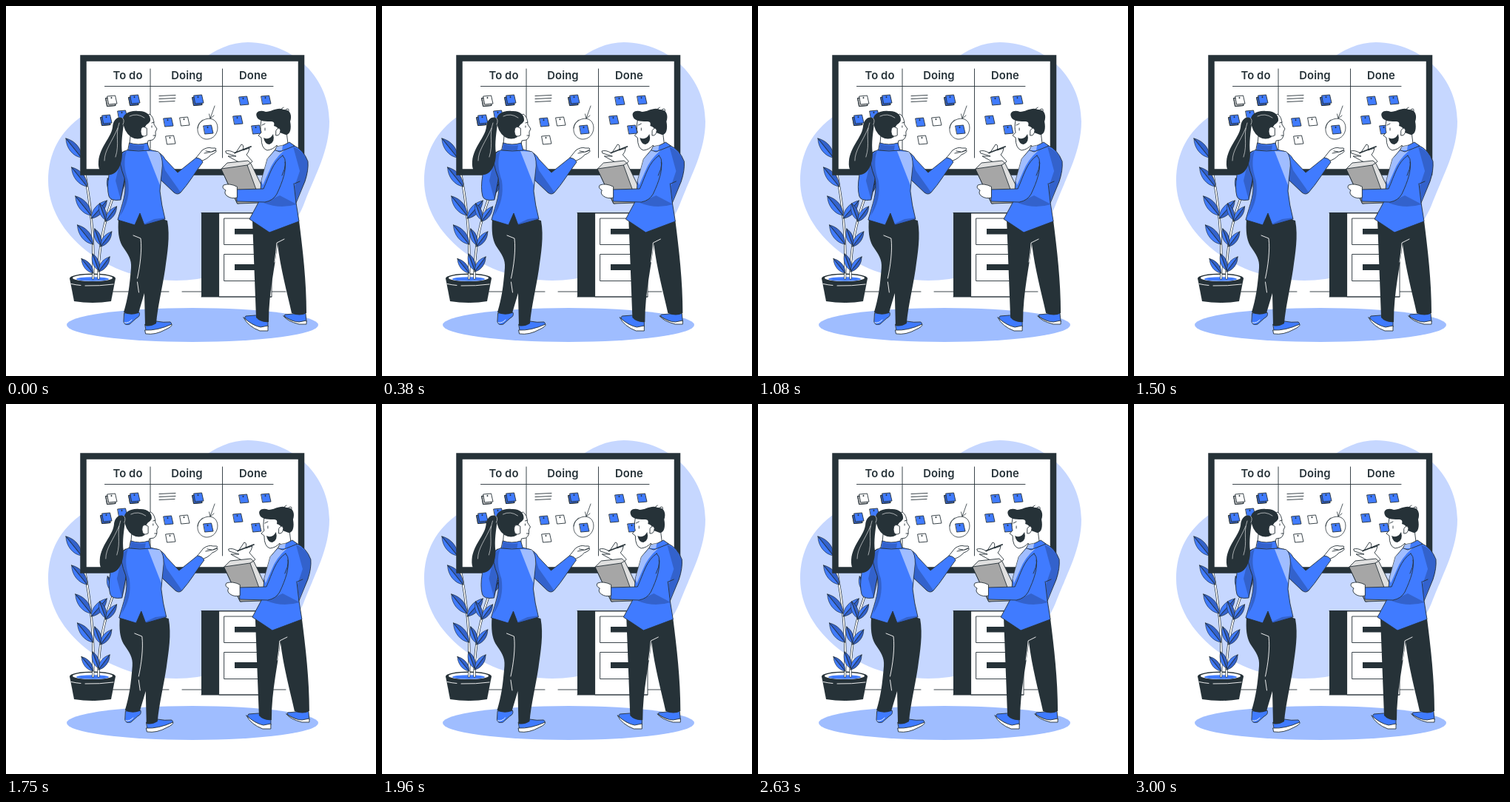
Animation of 500 by 500 pixels, one loop 3.04 s. Source, as an HTML page:

```html
<!DOCTYPE html>
<html lang="en">
<head>
<meta charset="utf-8">
<title>Task board</title>
<style>
html, body { margin: 0; width: 100%; height: 100%; overflow: hidden; background: #fff; }
svg { display: block; width: 100vw; height: 100vh; }
path, ellipse { stroke-linejoin: round; stroke-linecap: round; }
text { font: 600 14.8px Inter, "Open Sans", sans-serif; letter-spacing: .1px; fill: #263238; text-anchor: middle; }
.b { fill: #407bff; stroke: #263238; }
.w { fill: #fff; stroke: #263238; }
.d { fill: #263238; }
.l { fill: none; stroke: #263238; }
.wl { fill: none; stroke: #fff; }
.sh { fill: #000; fill-opacity: .2; }
.hi { fill: #fff; fill-opacity: .5; }
</style>
</head>
<body>
<svg viewBox="0 0 500 500" stroke-width=".9">
  <defs>
    <path id="sheet" d="M0 1L10.500 0L13 11L2 12Z"/>
    <g id="note"><use href="#sheet"/><circle class="d" cx="5.500" cy="3" r=".7"/></g>
    <g id="stack"><use href="#sheet" x="-1" y="2.500"/><use href="#sheet" x="-1" y="2.500" class="sh"/><use href="#note" x="1"/></g>
  </defs>

  <path fill="#c6d7ff" d="M104 148C150 122 222 106 260 77C282 58 305 49 327 49C390 50 437 98 437 156C437 195 418 228 404 264C382 326 306 371 230 371C138 371 57 309 57 236C57 199 73 169 104 148Z"/>
  <ellipse cx="252" cy="431" rx="170" ry="23" fill="#9fbdff"/>
  <path class="l" d="M141 386H220M238 386H378"/>

  <g id="cabinet">
    <path class="w" d="M288 280H359V393H288Z"/>
    <path class="d" d="M264 279H288V393H264Z"/>
    <path class="l" d="M264 279.500H359M264 393H359M295 287H354V322.500H295ZM295 335.500H354V371.500H295Z"/>
    <path class="d" d="M309 301H340V308.500H309ZM309 349H340V357H309Z"/>
  </g>

  <g id="plant">
    <path class="d" d="M86 368L92 399Q117 403 142 399L148 368Z"/>
    <ellipse cx="117" cy="368" rx="31" ry="6.500" class="d"/>
    <ellipse cx="117" cy="367.500" rx="27" ry="4.500" fill="#fff"/>
    <ellipse cx="117" cy="369" rx="22" ry="2.800" fill="#407bff"/>
    <path class="wl" d="M88 375.500Q95 377 101 377.500M107 378Q127 378.500 145 376"/>
    <g id="leaves"></g>
  </g>

  <g id="board">
    <path fill="#fff" stroke="#263238" stroke-width="8.500" style="stroke-linejoin:miter" d="M104.500 70.500H399V224.500H104.500Z"/>
    <path class="l" d="M133.500 108.500H361M195 85V205M292.500 85V205"/>
    <text x="164.500" y="99">To do</text>
    <text x="244.500" y="99">Doing</text>
    <text x="334" y="99">Done</text>
    <path class="l" d="M207 121.500L229 120.500M207 125.500L229 124.500M207 129.500L228 128.500"/>
    <g class="b">
      <use href="#stack" x="167" y="120"/>
      <use href="#stack" x="129" y="147"/>
      <use href="#note" x="151" y="141"/>
      <use href="#stack" x="253" y="120"/>
      <use href="#note" x="213" y="151"/>
      <use href="#note" x="267" y="161"/>
      <use href="#note" x="315" y="122"/>
      <use href="#note" x="345" y="121"/>
      <use href="#note" x="307" y="148"/>
      <use href="#note" x="332" y="161"/>
    </g>
    <g class="w">
      <use href="#stack" x="136" y="121"/>
      <use href="#note" x="235" y="150"/>
      <use href="#note" x="216" y="175"/>
    </g>
    <path class="l" stroke-width=".8" d="M266 154C255 160 257 178 270 180C287 181 291 158 279 153C272 150 260 155 259 165M282 135L276 152M274.500 146L276 152L281 148"/>
  </g>

  <g id="woman">
    <path class="b" d="M160 415L180 414Q182 419 176 422L167 430Q160 432 159 427Z"/>
    <path class="wl" d="M160 428Q166 429 170 424"/>
    <path class="b" d="M188 430L203 426Q213 428 222 427Q226 430 220 433Q205 441 190 441Z"/>
    <path class="w" d="M188 438Q204 439 224 430Q225 433 216 437Q202 445 189 443Z"/>
    <path class="d" d="M152 288C151 304 152 315 157 324C165 336 170 342 169 354C167 379 165 394 159 414Q168 419 179 415L187 388L188 432Q195 434 203 429C205 406 211 382 215 356C218 334 222 312 218 290L182 279Z"/>
    <path class="wl" d="M172 310L182 314C184 330 181 352 177.500 368M177.500 373L179.500 387"/>
    <path class="b" d="M160 196C150 201 143 212 139 229Q136 246 139 257Q141 264 155 262L162 225Z"/>
    <path class="sh" d="M154 210L148 236L155 262L162 240Z"/>
    <path class="w" d="M257 205L265 195Q272 190 278 192L283 192Q286 194 278 197L284 195Q285 198 277 201Q271 208 262 210Z"/>
    <path class="l" d="M270 196L276 197M268 199L278 197"/>
    <path class="b" d="M202 196Q211 199 215 207L232 225L257 205Q264 206 266 211C256 224 247 240 236 252Q232 256 227 252L207 233Z"/>
    <path class="sh" d="M210 205L215 222L232 246L236 252Q232 255 227 252L207 233Z"/>
    <path class="b" d="M166 194Q180 196 193 194L206 197Q212 203 211 216L208 250Q210 269 215 288L187 296L181 280L174 296L151 289C157 267 164 252 160 232Q152 212 155 202Q158 196 166 194Z"/>
    <path class="sh" d="M163 196Q157 214 165 236Q169 262 154 284C160 264 164 250 160 232Q152 212 155 202ZM187 294L200 288L215 286L214 288L187 296Z"/>
    <path class="hi" d="M190 196L206 197Q211 203 211 216L208 242Z"/>
    <path class="w" d="M168 176L167 187Q179 193 191 188L192 182L198 181Q203 178 202 170L204 166L200 160Q200 150 194 146L172 158Z"/>
    <path class="l" d="M197 158L200 157M197 162V164M199 175L202 175"/>
    <path class="b" d="M167 185Q179 189 191 185L194 195Q179 197 165 195Z"/>
    <path class="sh" d="M167 186Q177 190 187 188L186 195H166Z"/>
    <path class="d" d="M158 155C157 146 167 141 178 142C189 141 196 147 195 155C193 160 189 159 188 164L182 168L186 177Q178 182 169 177Q159 170 158 155Z"/>
    <path class="w" d="M190 165Q182 160 182 170Q183 179 190 175Z"/>
    <path class="d" d="M160 152C152 148 145 152 144 164C142 178 127 190 125 210C124 222 129 228 138 228C150 229 157 215 157 199C155 184 158 170 159 159Z"/>
    <path class="wl" stroke-width=".6" d="M157 151Q161 154 158 160M153 158C147 175 154 185 148 204M167 149Q177 144 187 151M151 165C143 184 133 195 133 209"/>
  </g>

  <g id="man">
    <path class="b" d="M337 418L324 419Q320 422 329 428L344 436L354 434L354 426Z"/>
    <path class="w" d="M321 421Q333 432 344 434L354 432V439L343 439Q327 433 321 421Z"/>
    <path class="b" d="M388 416L377 417Q374 419 382 423L395 429L406 427L405 416Z"/>
    <path class="w" d="M375 419Q387 427 396 427L406 425V430H396Q380 426 375 419Z"/>
    <path class="d" d="M333 290L338 421Q344 428 355 427C355 386 364 350 367 322C371 355 380 388 386 415Q397 420 406 415C406 371 401 330 396 290Z"/>
    <path class="wl" d="M376 315L366 320Q365 334 363 346"/>
    <path class="w" d="M297 196Q302 194 310 199L318 187Q322 187 320 195L329 192Q328 198 325 201L333 210L326 217L311 209L300 203L311 203L298 199Z"/>
    <path class="l" stroke-width="1.800" d="M309 198.500L331 190"/>
    <path fill="#e0e0e0" stroke="#263238" d="M291 220L299 212L327 209L331 213L347 246L342 263L313 267Z"/>
    <path fill="#a6a6a6" stroke="#263238" d="M291 220L326 215L342 259V266L313 267Z"/>
    <path class="l" d="M326 215L331 212"/>
    <path class="b" d="M365 193Q376 190 388 188Q402 194 408 210Q409 222 404 237L392 266L396 291L356 306L329 288L343 262L345 236L353 207Z"/>
    <path class="sh" d="M388 190Q404 197 408 212Q408 224 404 237L392 263L390 244L397 223ZM348 266L370 256L393 268Q370 275 348 266Z"/>
    <path class="hi" d="M364 195L376 195Q361 208 355 224L347 242L345 236L353 207Z"/>
    <path class="b" d="M374 202C360 211 356 229 348 247L311 248L312 264L350 265Q361 263 366 254C374 237 379 222 377 211"/>
    <path class="l" d="M374 202Q382 210 373 229M390 240L397 237M389 240L392 266"/>
    <path class="w" d="M312 244Q302 239 294 242Q291 246 297 249Q294 253 299 257Q305 261 312 259Z"/>
    <path class="w" d="M345 154Q343 165 345 171L341 175L345 178Q345 193 353 195Q361 194 366 188L367 193L381 186L379 170L364 153Z"/>
    <path class="b" d="M366 190Q376 189 383 184L390 189L370 197L364 195Z"/>
    <path class="hi" d="M366 190L374 188L373 195L364 195Z"/>
    <path class="d" d="M339 150C336 143 343 140 351 143C359 143 367 136 375 140C384 139 387 148 384 156C386 166 384 174 378 174L370 171Q368 163 362 162Q364 155 357 156C348 156 341 155 339 150Z"/>
    <path class="l" d="M371 140L375 137M378 140Q383 137 382 142M346 161L350 159M350 165V168"/>
    <path class="w" d="M365 168Q369 162 371 168Q370 176 365 175Z"/>
    <path class="d" d="M348 178Q356 182 361 173Q364 184 356 187Q350 187 348 178Z"/>
  </g>
</svg>
<script>
const $ = id => document.getElementById(id);

// A leaf from its base (x, y) towards (x + dx, y + dy)
function leaf(x, y, dx, dy) {
  const n = Math.hypot(dx, dy), a = Math.atan2(dy, dx) * 180 / Math.PI;
  const half = s => `M0 0C${n * .25} ${s * n * .24} ${n * .7} ${s * n * .24} ${n} 0Z`;
  return `<g transform="translate(${x} ${y}) rotate(${a})" stroke-width=".6">
    <path class="b" d="${half(1) + half(-1)}"/><path class="sh" d="${half(1)}"/></g>`;
}

// Two curved stems, each with leaves at even steps
function stem(xAt, top) {
  let d = '';
  for (let y = 368; y >= top; y -= 8) d += (d ? 'L' : 'M') + xAt(y) + ' ' + y;
  return `<path class="l" stroke-width="3.200" d="${d}"/><path class="wl" stroke-width="1.800" d="${d}"/>`;
}
const left = y => 118 - ((345 - y) / 35) ** 2;
const right = y => 125 + ((365 - y) / 24) ** 2;
let plant = stem(left, 205) + stem(right, 245);
for (let y = 205; y < 370; y += 39) {
  const size = y > 330 ? .75 : 1;
  plant += leaf(left(y), y, -21 * size, -26 * size);
}
plant += leaf(left(287), 287, 21, -24);
for (let y = 257; y < 370; y += 34) {
  plant += leaf(right(y), y, 15, -20) + leaf(right(y), y - 2, -8, -22);
}
$('leaves').innerHTML = plant;

// The CSS "ease" curve
const bez = (u, a, b) => 3 * u * (1 - u) ** 2 * a + 3 * u * u * (1 - u) * b + u ** 3;
function ease(x) {
  let lo = 0, hi = 1;
  for (let i = 0; i < 20; i++) {
    const mid = (lo + hi) / 2;
    bez(mid, .25, .25) < x ? lo = mid : hi = mid;
  }
  return bez(lo, .1, 1);
}

// Sideways shake in ten steps, the second half mirroring the first
const stops = [0, -1, 2, -4, 4, -4];
const stop = i => stops[Math.min(i, 10 - i)];
function shake(t, period) {
  const p = t % period / period * 10, i = Math.floor(p);
  return stop(i) + (stop(i + 1) - stop(i)) * ease(p - i);
}

function draw() {
  const t = Math.min(performance.now() % 3040, 3000);
  $('woman').setAttribute('transform', `translate(${shake(t, 1500)})`);
  $('man').setAttribute('transform', `translate(${shake(t, 3000)})`);
  requestAnimationFrame(draw);
}
draw();
</script>
</body>
</html>
```
